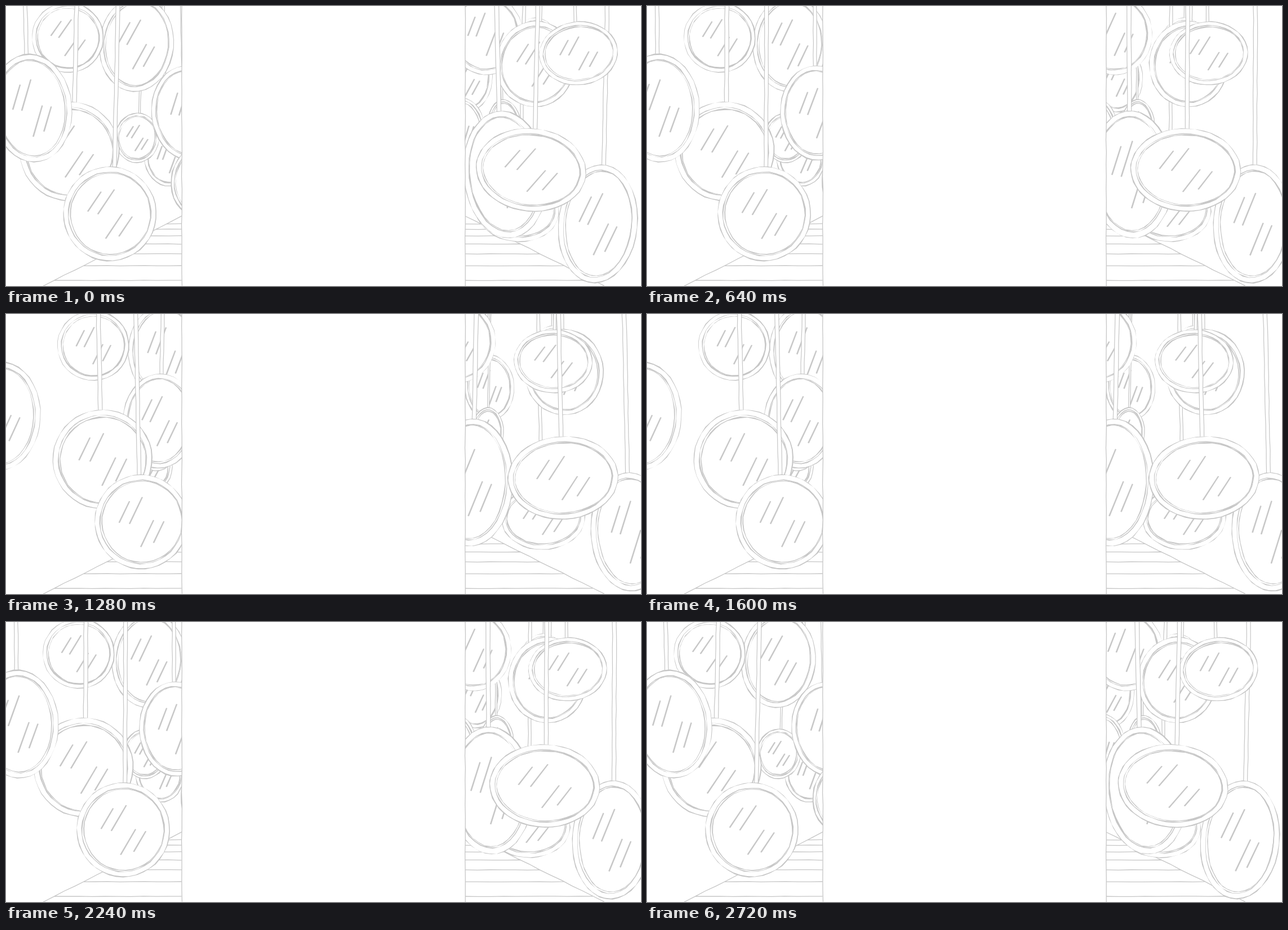
Recreate the animation shown at these times as an HTML page with a canvas. Size 1127 by 497 pixels, loop 2.88 s.

```html
<!DOCTYPE html>
<html>
<head>
<meta charset="utf-8">
<style>
  html, body { margin: 0; height: 100%; overflow: hidden; background: #fff; }
  canvas { display: block; }
</style>
</head>
<body>
<canvas id="stage" width="1127" height="497"></canvas>
<script>
const ctx = document.getElementById('stage').getContext('2d');
const W = 1127, H = 497, LEFT = 312, RIGHT = 815;
const LOOP = 2880, STEP = 160, INK = '#c6c6c6', TAU = Math.PI * 2;

let seed = 11;
const random = () => (seed = seed * 16807 % 2147483647) / 2147483647;
const jitter = a => (random() * 2 - 1) * a;

function wobblyEllipse(path, x, y, rx, ry) {
  const n = Math.round(20 + rx / 4);
  for (let i = 0; i < n; i++) {
    const a = i / n * TAU, k = jitter(.6);
    path.lineTo(x + (rx + k) * Math.cos(a), y + (ry + k) * Math.sin(a));
  }
  path.closePath();
}

// A pen line whose thickness varies: the gap between two uneven ellipses
function ring(rx, ry, shift) {
  const path = new Path2D(), inner = new Path2D();
  const x = jitter(shift), y = jitter(shift);
  wobblyEllipse(path, x, y, rx + .6, ry + .6);
  wobblyEllipse(inner, x + jitter(.5), y + jitter(.5), rx - .7, ry - .7);
  path.addPath(inner);
  return path;
}

function wobblyLine(path, x0, y0, x1, y1) {
  const n = Math.max(1, Math.round(Math.hypot(x1 - x0, y1 - y0) / 22));
  path.moveTo(x0, y0);
  for (let i = 1; i <= n; i++) {
    const k = i / n;
    path.lineTo(x0 + (x1 - x0) * k + jitter(.5), y0 + (y1 - y0) * k + jitter(.5));
  }
}

// Two slanted strokes, one long and one short, repeated on the opposite side
function glints(rx, ry) {
  const path = new Path2D();
  for (const side of [-1, 1]) {
    for (const [x, y, length] of [[.11, .25, 1], [.36, .23, .8]]) {
      const cx = side * x * rx, cy = side * y * ry;
      const dx = -.145 * length * rx, dy = .275 * length * ry;
      path.moveTo(cx - dx, cy - dy);
      path.lineTo(cx + dx - .8, cy + dy);
      path.lineTo(cx + dx + 1, cy + dy + .6);
      path.lineTo(cx - dx + 1.6, cy - dy + .4);
      path.closePath();
    }
  }
  return path;
}

// x and y are the middle of the swing; larger mirrors hang closer and swing farther
function mirror(x, y, rx, ry, dir) {
  const size = Math.sqrt(rx * ry), rim = size * .11, half = size * .04;
  const length = y - ry + 40, cord = new Path2D();
  for (const side of [-half, half]) wobblyLine(cord, side, 2, side, -length);
  return {
    x, y, rx, ry, dir, half, length, cord,
    reach: 6 + .275 * size,
    rings: [ring(rx, ry, 0), ring(rx - rim, ry - rim, .6), ring(rx - rim - 2.2, ry - rim - 2.2, 1.4)],
    glint: glints(rx, ry)
  };
}

// Both groups run from back to front
const leftGroup = [
  [270, 270, 43, 50], [250, 234, 39, 44], [258, 68, 66, 84],
  [297, 190, 65, 84], [133, 56, 63.5, 62], [143, 258, 88, 88],
  [17, 181, 71, 96], [213, 369, 82.5, 83.5], [363, 311, 49, 62]
].map((m, i) => mirror(...m, i % 3 ? 1 : -1));

const rightGroup = [
  [839, 130, 44, 58], [869, 211, 29, 45], [956, 62, 38, 41], [793, 215, 38, 52],
  [931, 362, 74, 56], [826, 50, 66, 72], [966, 103, 70, 76], [855, 299, 74, 113],
  [1080, 387, 70, 105], [993, 84, 69.5, 56], [961, 291, 97.5, 73.5]
].map((m, i) => mirror(...m, i % 2 ? -1 : 1));

function drawMirror(m, swing) {
  const tilt = m.dir * (.025 + .075 * swing);
  ctx.save();
  ctx.translate(m.x - m.dir * m.reach * swing, m.y);

  // The cord leans less than the disc and stays pinned to its top
  ctx.save();
  ctx.translate(m.ry * Math.sin(tilt), -m.ry);
  ctx.rotate(m.dir * .022 * swing);
  ctx.fillStyle = '#fff';
  ctx.fillRect(-m.half, -m.length, m.half * 2, m.length + 2);
  ctx.lineWidth = 1.2;
  ctx.stroke(m.cord);
  ctx.restore();

  ctx.rotate(tilt);
  ctx.beginPath();
  ctx.ellipse(0, 0, m.rx, m.ry, 0, 0, TAU);
  ctx.fillStyle = '#fff';
  ctx.fill();
  ctx.fillStyle = INK;
  m.rings.forEach(r => ctx.fill(r, 'evenodd'));
  ctx.fill(m.glint);
  ctx.lineWidth = .7;
  ctx.stroke(m.glint);
  ctx.restore();
}

function buildRoom() {
  const floor = new Path2D(), edges = new Path2D(), horizon = 373;
  wobblyLine(floor, 66, H, LEFT, horizon);
  wobblyLine(floor, RIGHT, horizon, 1062, H);
  for (let i = 0; i < 7; i++) {
    const y = 343 + 144 * .82 ** i, reach = (y - horizon) * 1.985;
    wobblyLine(floor, LEFT - reach, y, LEFT, y);
    wobblyLine(floor, RIGHT, y, RIGHT + reach, y);
  }
  for (const x of [LEFT, RIGHT]) wobblyLine(edges, x, 0, x, H);
  return { floor, edges };
}

const room = buildRoom();

function draw() {
  const time = Math.floor(performance.now() % LOOP / STEP) * STEP;
  const swing = Math.cos(time / LOOP * TAU);
  ctx.fillStyle = '#fff';
  ctx.fillRect(0, 0, W, H);
  ctx.strokeStyle = INK;
  ctx.lineWidth = 1.3;
  ctx.stroke(room.floor);
  [...leftGroup, ...rightGroup].forEach(m => drawMirror(m, swing));
  ctx.fillStyle = '#fff';
  ctx.fillRect(LEFT, 0, RIGHT - LEFT, H);
  ctx.lineWidth = 1.3;
  ctx.stroke(room.edges);
  requestAnimationFrame(draw);
}
draw();
</script>
</body>
</html>
```
